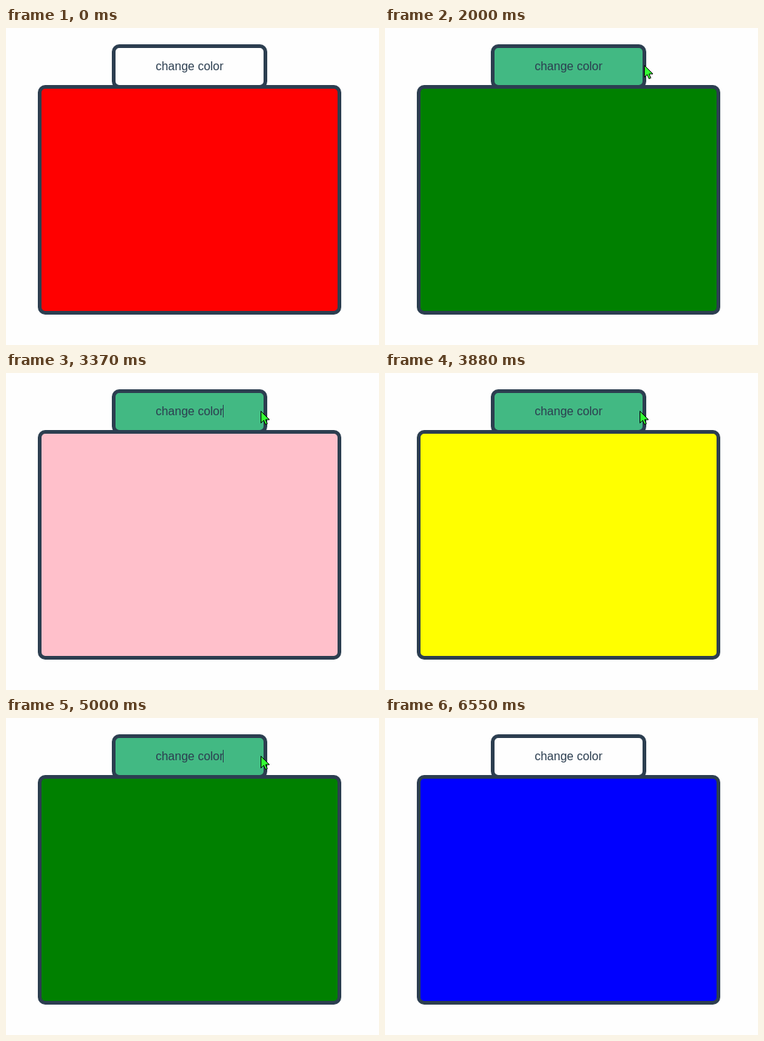
Recreate the animation shown at these times as an HTML page. Size 504 by 428 pixels, loop 6.76 s.

```html
<!DOCTYPE html>
<html lang="en">
<head>
<meta charset="utf-8">
<title>Change color</title>
<style>
  html, body { margin: 0; width: 100%; height: 100%; overflow: hidden; background: #fefefe; }
  div, svg { position: absolute; box-sizing: border-box; }
  #button, #panel { border: 5px solid #2c3e50; border-radius: 10px; }
  #button { left: 143px; top: 22px; width: 210px; height: 60px; }
  #panel { left: 43px; top: 77px; width: 410px; height: 310px; }
  #label {
    left: 143px; top: 43px; width: 210px; text-align: center;
    font: 16px/17px "Liberation Sans", Arial, sans-serif; color: #2c3e50;
  }
  #caret { left: 293px; top: 43px; width: 1px; height: 17px; background: #2c3e50; }
  #cursor { left: 0; top: 0; overflow: visible; }
</style>
</head>
<body>
<div id="button"></div>
<div id="label">change color</div>
<div id="caret"></div>
<div id="panel"></div>
<svg id="cursor" width="14" height="20">
  <path d="M.5 .5V16.5L4.2 13L6.7 18.5L9.2 17.5L6.8 12H12Z" fill="#3f3" stroke="#000"/>
</svg>
<script>
const LOOP = 6760;
const [button, caret, panel, cursor] =
  ['button', 'caret', 'panel', 'cursor'].map(id => document.getElementById(id));

const colors = ['red', 'green', 'blue', 'pink', 'yellow'];
const clicks = [1260, 2280, 3080, 3780, 4400, 5000, 5850];
const caretToggles = [1260, 1770, 2280, 2800, 3370, 3880, 4400, 5470, 6000, 6550];

const linear = p => p;
const smooth = p => p * p * (3 - 2 * p);
const easeIn = p => p ** 1.5;
const easeOut = p => 1 - (1 - p) ** 2;

// Pointer stops: time, x, y, easing used to arrive there
const stops = [
  [220, 356, 332, linear],
  [880, 327, 52, easeOut],
  [920, 327, 49, linear],
  [1580, 327, 49, linear],
  [1800, 374, 51, smooth],
  [2000, 350, 50, smooth],
  [2660, 350, 50, linear],
  [2800, 344, 51, smooth],
  [5850, 344, 51, linear],
  [6310, 352, 428, easeIn]
];

const countPast = (times, t) => times.filter(time => time <= t).length;

function pointerAt(t) {
  const next = stops.findIndex(stop => stop[0] > t);
  if (next < 1) return null;
  const [t0, x0, y0] = stops[next - 1];
  const [t1, x1, y1, ease] = stops[next];
  const p = ease((t - t0) / (t1 - t0));
  return { x: Math.round(x0 + (x1 - x0) * p), y: Math.round(y0 + (y1 - y0) * p) };
}

function draw(t) {
  const pointer = pointerAt(t);
  const hovered = pointer && pointer.x >= 143 && pointer.x < 353 && pointer.y < 77;
  cursor.style.display = pointer ? '' : 'none';
  if (pointer) cursor.style.transform = `translate(${pointer.x}px, ${pointer.y}px)`;
  button.style.background = hovered ? '#42b983' : 'none';
  caret.style.display = countPast(caretToggles, t) % 2 ? '' : 'none';
  panel.style.background = colors[countPast(clicks, t) % colors.length];
}

const start = performance.now();
function tick() {
  draw((performance.now() - start) % LOOP);
  requestAnimationFrame(tick);
}
tick();
</script>
</body>
</html>
```
